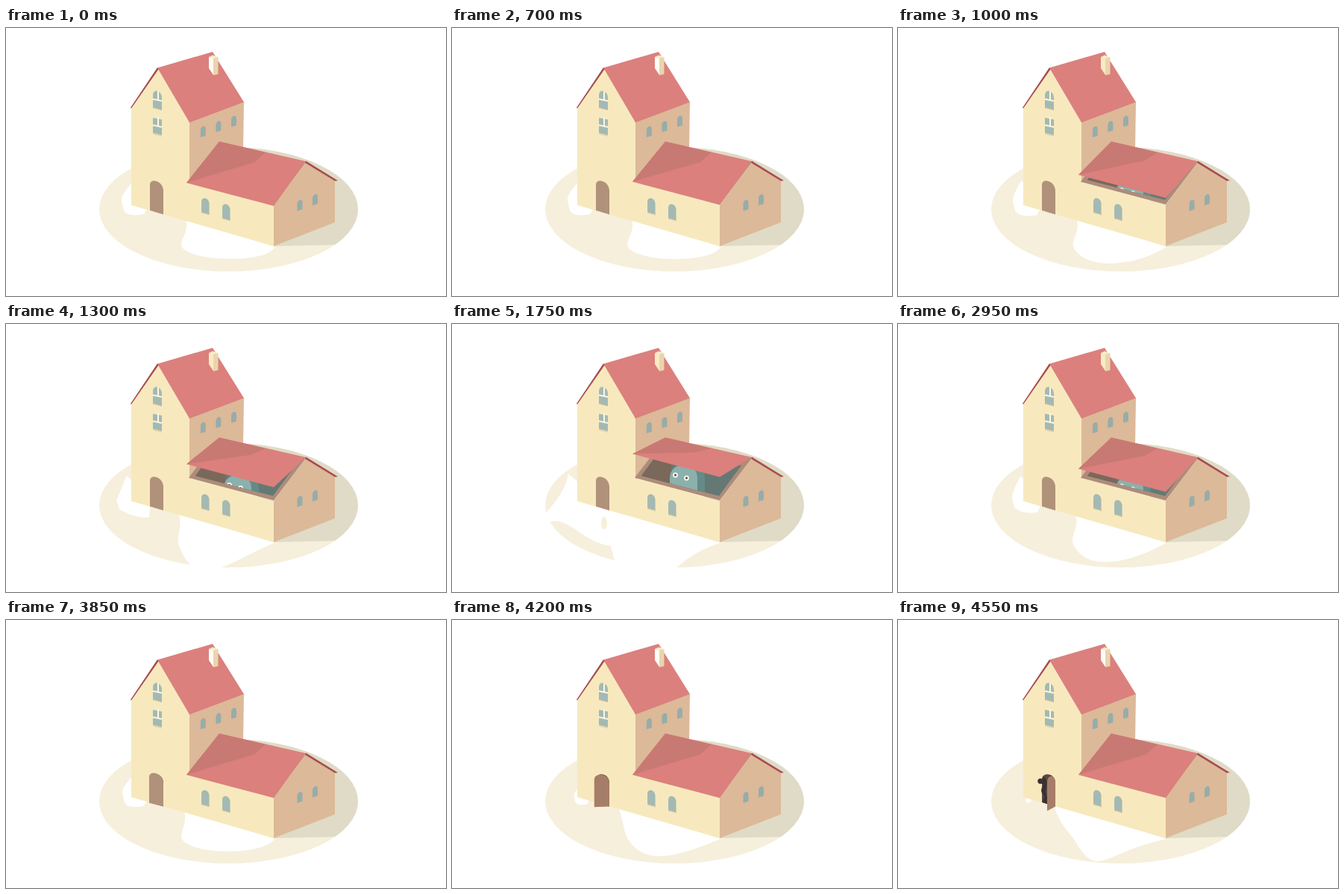
An HTML page that plays this animation: 590x360 px, repeating every 5.25 s.

```html
<!DOCTYPE html>
<html lang="en">
<head>
<meta charset="utf-8">
<title>House with a lifting roof</title>
<style>
  html, body { margin: 0; width: 100%; height: 100%; overflow: hidden; background: #fff; }
  svg { display: block; width: 590px; height: 360px; }
  .wall { fill: #f7e9bd; }
  .side { fill: #dcb998; }
  .roof { fill: #db807d; }
  .edge { fill: #a84c50; }
  .pane { fill: #a4b9b3; }
  .dim { fill: #96adaa; }
  .bar { fill: #fdf7e4; }
  .sill { fill: #dcc9a0; }
  .white { fill: #fff; }
  .cream { fill: #f6efdc; }
</style>
</head>
<body>
<svg viewBox="0 0 590 360">
  <defs>
    <clipPath id="ground"><ellipse cx="298.5" cy="243.5" rx="173.5" ry="83.5"/></clipPath>
    <clipPath id="room"><path d="M254 204L358 231L388 190L286 160Z"/></clipPath>
    <path id="arch" d="M-.5 .5V-.2C-.5-.62 .5-.62 .5-.2V.5Z"/>
  </defs>

  <ellipse class="cream" cx="298.5" cy="243.5" rx="173.5" ry="83.5"/>
  <path id="leftPatch" class="white"/>
  <path id="frontPatch" class="white"/>
  <ellipse id="drop" class="cream" cx="204" cy="267.5" rx="4" ry="8.5"/>
  <path clip-path="url(#ground)" fill="#dfdbc7" d="M310 150H480V290.5L359 293Z"/>

  <!-- tower -->
  <path class="side" d="M245 126L319 99L318 165L245 210Z"/>
  <path class="wall" d="M204 55L246 127V207L359 238V293L168 238V108Z"/>
  <path class="roof" d="M203 53.5L277 32L319 99.5L246 127Z"/>
  <path class="edge" d="M203 53L204.5 55.5L168 108L167 107Z"/>
  <path id="chimney" d="M272 39L278 40V63L272 54Z"/>
  <path fill="#e9d5ad" d="M278 40L284.500 39V62L278 63.500Z"/>
  <path fill="#f6ebcb" d="M272 39L277 36.500L284.500 39L278 41Z"/>

  <!-- annex -->
  <path class="side" d="M359 238L402 180L441 205V261L359 293Z"/>
  <path fill="#ad8c79" d="M245 206.500L359 237L402 180L286 153Z"/>
  <g clip-path="url(#room)">
    <path fill="#647974" d="M240 150H410V240H240Z"/>
    <path fill="#7a685b" d="M240 150H294V240H240Z"/>
    <g id="guest">
      <path fill="#648b87" d="M302 260V207C302 183 339 183 339 207V260Z"/>
      <path fill="#8cb0ad" d="M292 260V207C292 183 329 183 329 207V260Z"/>
      <g fill="#fbf6e4"><circle cx="299.500" cy="203" r="3.400"/><circle cx="314.500" cy="207" r="3.400"/></g>
      <g fill="#433f3c"><circle cx="299.500" cy="203" r="1.400"/><circle cx="314.500" cy="207" r="1.400"/></g>
    </g>
  </g>
  <path id="roof" class="roof"/>
  <path id="shade" fill="#c97973"/>
  <path class="edge" d="M402 178.500L445 205L441 205.500L401 181Z"/>

  <g id="windows"></g>

  <!-- door -->
  <path id="doorway" fill="#584740" d="M193 245V214C193 204 211 205 211 219V250.500Z"/>
  <g id="visitor" fill="#3b3133" stroke="#3b3133">
    <circle cx="191" cy="216.500" r="3.300"/>
    <path stroke="none" d="M194 211C198 211 200 215 199.500 222L198 231L200 238V247L194 245L196 236C191 232 191 227 195 222Z"/>
    <path fill="none" stroke-width="2" d="M192 218L197 221"/>
  </g>
  <path id="door"/>
</svg>
<script>
const LOOP = 5250, STEP = 50;
const el = id => document.getElementById(id);
const mix = (a, b, k) => a + (b - a) * k;
const set = (id, name, value) => el(id).setAttribute(name, value);
const show = (id, on) => set(id, 'visibility', on ? 'visible' : 'hidden');

const arch = (cls, x, y, w, h, slant) =>
  `<use href="#arch" class="${cls}" transform="matrix(${w} ${slant * w} 0 ${h} ${x} ${y})"/>`;
const sill = (x, y, w) =>
  `<path class="sill" d="M${x} ${y}l${w} ${w * .27}v1l${-w} ${-w * .27}z"/>`;

// Small windows stand in evenly spaced rows along a wall
const row = (count, x, y, dx, dy, slant) => Array.from({ length: count }, (_, i) =>
  arch('dim', x + i * dx, y + i * dy, 7, 13.5, slant)).join('');

const frontWindow = i =>
  arch('pane', 267.3 + 28 * i, 239 + 8 * i, 10.5, 20, .27) + sill(262 + 28 * i, 247.5 + 8 * i, 11);

// Tower window: panes, crossbar and upright, arched or square at the top
const towerWindow = (y, arched) =>
  (arched ? arch('pane', 203, y + 2, 12, 24, .25)
          : `<path class="pane" d="M197 ${y - 9.500}l12 2.500v21l-12-3z"/>`)
  + `<path class="bar" d="M197 ${y - .5}l12 2.500v2l-12-2.500zM203 ${y - 10}h2v11h-2z"/>`
  + sill(197, y + 11.5, 12);

el('windows').innerHTML = row(3, 264.3, 139, 20.6, -7, -.3) + row(2, 394, 238, 20.5, -7.5, -.35)
  + frontWindow(0) + frontWindow(1) + towerWindow(95, true) + towerWindow(130, false);

// Share of a stepped move that is done; the first step shows at its start
const done = (t, start, steps) =>
  Math.max(0, Math.min(1, ((t - start) / STEP + 1) / steps));

function drawRoof(lift) {
  const up = 33.5 * lift;
  set('roof', 'd', `M286 152.500L402 179L359 ${239 - up}L242 ${208 - up}Z`);
  set('shade', 'd', `M286 152.500L348 167L${333 - 6 * lift} ${180.5 - 8 * lift}L242 ${208 - up}Z`);
  set('guest', 'transform', `translate(0 ${Math.min(15, 33 * (1 - lift))})`);
  set('chimney', 'fill', lift > .2 ? '#f8ebc2' : '#fffdf6');
}

// The white patches widen as the roof lifts, late in the move
function drawPatches(lift, open) {
  const late = lift ** 3;
  const shrink = 1 - .8 * open;
  set('leftPatch', 'd', `M${170 - 14 * lift} ${207 - 6 * lift}
    Q153 225 ${155 - 33 * late} ${232 + 26 * late}
    L${158 - 28 * late} ${245 + 21 * late}
    C${162 - 4 * late} ${253 + 4 * late} 176 ${252 + 44 * late} ${185 + 31 * late} ${250 + 48 * late}
    L195 235Z`);
  set('leftPatch', 'transform', `translate(175 244) scale(${shrink}) translate(-175 -244)`);

  const wallX = 240 - 45 * late - 32 * open, wallY = 234 + .288 * (wallX - 168);
  const footX = 237 - 20 * late, footY = 296 + 18 * late;
  set('frontPatch', 'd', `M${wallX} ${wallY}
    C${wallX + 8} 275 ${footX - 7} 285 ${footX} ${footY}
    C${256 + 12 * open} ${315 + 130 * lift ** 2 + 35 * open}
     ${354 - 95 * lift - 79 * open} ${315 + 8 * lift - 3 * open} 360 294Z`);
  show('drop', lift > .85);
}

// The door swings on its right side, then the visitor leans out from behind it
function drawDoor(open) {
  const angle = open * Math.PI / 2, c = Math.cos(angle), s = Math.sin(angle);
  const dy = -5.5 * c + 6 * s;
  const x = 211 - 18 * c - 11 * s, base = 250.5 + dy, top = 214 + dy * .6;
  set('door', 'd', `M211 250.500V219C211 ${mix(205, 206, open)} ${x} ${top - 10} ${x} ${top}V${base}Z`);
  set('door', 'fill', open > .2 ? '#a67d68' : '#b0917a');
  const peek = Math.max(0, (open - .65) / .35);
  set('visitor', 'transform', `translate(${12 * (1 - peek)} 0)`);
  show('visitor', peek > 0);
  show('doorway', open > 0);
}

function draw(time) {
  const t = Math.floor((time % LOOP) / STEP) * STEP;
  const lift = done(t, 700, 22) - done(t, 2700, 10);
  const open = done(t, 3850, 15);
  drawRoof(lift);
  drawPatches(lift, open);
  drawDoor(open);
}

const start = performance.now();
function tick() {
  draw(performance.now() - start);
  requestAnimationFrame(tick);
}
tick();
</script>
</body>
</html>
```
